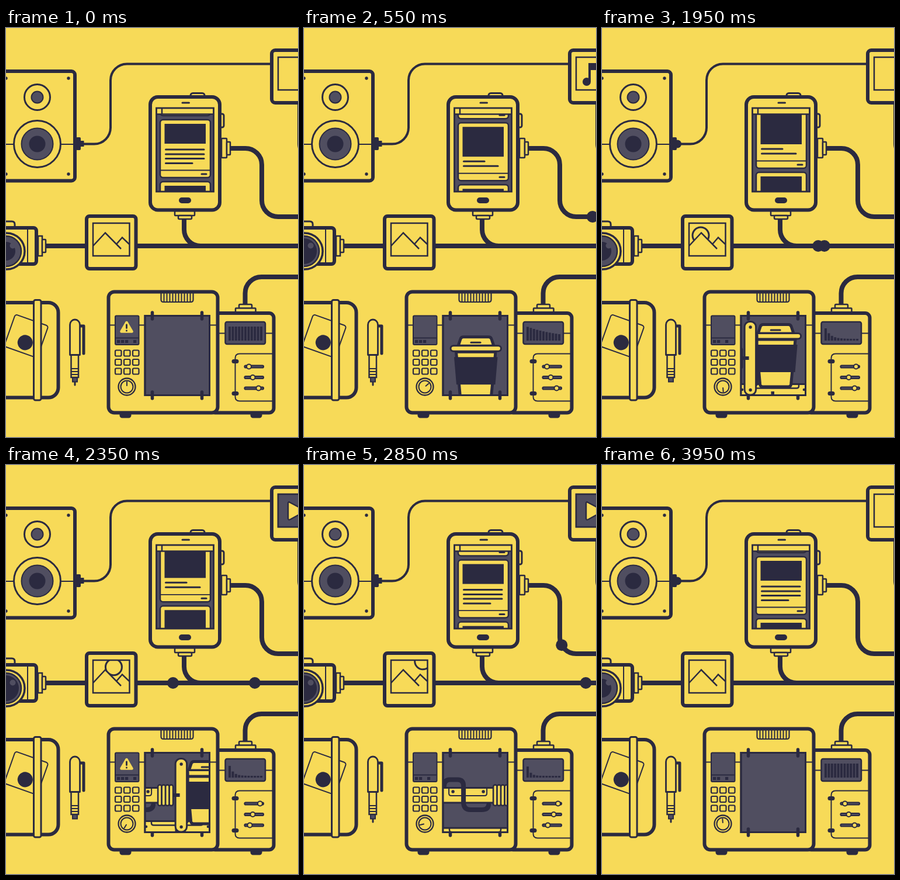
Animation, 500 px wide and 700 px high, one loop 4000 ms. Source, as an HTML page:

```html
<!DOCTYPE html>
<html lang="en">
<head>
<meta charset="utf-8">
<title>Connected devices</title>
<style>
  html, body { margin: 0; width: 100%; height: 100%; overflow: hidden; background: #f7da58; }
  svg { display: block; width: 500px; height: 700px; }
</style>
</head>
<body>
<svg id="stage" viewBox="0 0 500 700"></svg>
<script>
const INK = '#2b2a40', GREY = '#504e60', SUN = '#f7da58';
const LOOP = 4000;
const stage = document.getElementById('stage');

// Markup helpers; boxes are given by their stroke centre line.
const box = (x1, y1, x2, y2, r = 0, w = 3, fill = SUN, id = '') =>
  `<rect ${id && `id="${id}"`} x="${x1}" y="${y1}" width="${x2 - x1}" height="${y2 - y1}" rx="${r}" fill="${fill}" stroke="${INK}" stroke-width="${w}"/>`;
const line = (d, w = 3, fill = 'none') =>
  `<path d="${d}" fill="${fill}" stroke="${INK}" stroke-width="${w}" stroke-linecap="round" stroke-linejoin="round"/>`;
const flat = (d, w = 3) => `<path d="${d}" fill="none" stroke="${INK}" stroke-width="${w}"/>`;
const disc = (x, y, r, w = 0, fill = INK, id = '') =>
  `<circle ${id && `id="${id}"`} cx="${x}" cy="${y}" r="${r}" fill="${fill}" stroke="${INK}" stroke-width="${w}"/>`;
const group = (id, body, attrs = '') => `<g id="${id}" ${attrs}>${body}</g>`;
const clip = (id, x, y, w, h) =>
  `<clipPath id="${id}"><rect x="${x}" y="${y}" width="${w}" height="${h}"/></clipPath>`;
const repeat = (n, f) => Array.from({ length: n }, (_, i) => f(i)).join('');

const signals = [
  { d: 'M455 61.5H207A28 28 0 0 0 179 89.5V170.5A28 28 0 0 1 151 198.5H128', r: 7, from: 1000, to: 2000, every: 2000, ease: p => 1 - (1 - p) ** 2 },
  { d: 'M510 323H466A28 28 0 0 1 438 295V234A28 28 0 0 0 410 206H375', r: 10, from: 468, to: 1643, every: 2000, ease: p => p },
  { d: 'M305 320V345A28 28 0 0 0 333 373H510', r: 10, from: 917, to: 3094, every: LOOP, ease: p => p },
  { d: 'M510 373H180', r: 10, from: 1120, to: 2820, every: LOOP, ease: p => p ** 1.2 }
];

const wires = () =>
  flat('M133 198.5H151A28 28 0 0 0 179 170.5V89.5A28 28 0 0 1 207 61.5H455', 4) +
  flat('M501 130V198A28 28 0 0 0 520 225', 4) +
  flat('M384 206H410A28 28 0 0 1 438 234V295A28 28 0 0 0 466 323H510', 8) +
  flat('M305 325V345A28 28 0 0 0 333 373', 8) +
  flat('M66 373H510', 8) +
  flat('M409.5 474V454A28 28 0 0 1 437.5 426H510', 8);

const speaker = () =>
  box(-20, 74, 118, 261.5, 6, 6) +
  [[0, 86], [107, 86], [0, 250], [107, 250]].map(([x, y]) => disc(x, y, 2.7)).join('') +
  flat('M0 199H118', 2) +
  disc(53.5, 118.5, 22, 3, SUN) + disc(53.5, 118.5, 10, 2, GREY) +
  disc(53.5, 198.5, 40, 3, SUN) + disc(53.5, 198.5, 27, 2, GREY) + disc(53.5, 198.5, 14) +
  box(121, 188, 127, 208, 1, 2, INK) + box(127, 194, 132.5, 202, 0, 2, INK);

const monitor = () =>
  box(455, 38, 540, 128, 6, 6) + box(466, 50, 540, 106, 0, 2.5) +
  group('note', disc(484, 92, 7) + disc(507, 92, 7) + flat('M489 92V61', 4) +
    `<path d="M487 60H515V72H487Z" fill="${INK}"/>`) +
  group('play', box(466, 50, 540, 106, 0, 2.5, GREY) +
    line('M486 64Q483 62 483 66V91Q483 95 487 93L509 81Q512 78 509 76Z', 2.5, SUN));

const camera = () =>
  line('M-5 342V331H10Q15 331 15 336V342', 3, SUN) +
  box(-20, 342, 52, 404, 5, 6) + flat('M37 342V404', 2) +
  box(55, 356, 62, 390, 0, 2.5) + box(62, 362, 68, 384, 1, 2.5) +
  disc(1, 382, 31, 3.5, SUN) + disc(0, 382, 26, 2.5, GREY) +
  disc(0, 382, 16, 0, INK, 'pupil') + disc(11.5, 372.5, 5, 0, GREY);

const picture = () =>
  box(138, 322, 222.5, 412, 5, 6) +
  `<g clip-path="url(#photoClip)">` + disc(0, 0, 14, 3, SUN, 'sun') +
  `<path d="M149 373L170 350.5L190 370L199 358.5L211 370V392H149Z" fill="${SUN}"/>` +
  `</g>` +
  flat('M149 373L170 350.5L197 378M189.5 369.5L199 358.5L211 370', 2.5) +
  box(149, 334, 211.5, 390, 0, 2.5, 'none');

const feedCard = (y, tall) => {
  const image = tall ? 58 : 41;
  const rows = tall ? [[66, 309], [74, 332]] : [[51, 339], [59, 339], [66.5, 339], [74.5, 319]];
  return `<g transform="translate(0 ${y})">` + box(264, 0, 350, 99, 5, 2.5) +
    `<rect x="271.5" y="7" width="70.5" height="${image - 7}" fill="${INK}"/>` +
    rows.map(([ry, x]) => line(`M273.5 ${ry}H${x}`)).join('') +
    flat('M264 86.5H350', 1.8) + line('M335 93H343') + '</g>';
};

const phone = () =>
  box(316, 111.5, 340, 122, 4, 3) + box(362, 147, 373, 170, 3, 3) +
  box(369, 189, 378, 222, 1, 2.5) + box(378, 195, 384, 217, 1, 2.5) +
  box(289, 313, 323, 321, 1, 2.5) + box(295, 321, 318, 327, 2, 2.5) +
  box(247, 118, 366, 311.5, 13, 6) + line('M302 128H313.5', 3) +
  `<rect x="257" y="147" width="99" height="133" fill="${GREY}"/>` +
  `<g clip-path="url(#feedClip)">` +
  group('feed', repeat(5, i => feedCard(157 + (i - 1) * 106, i % 2 === 0))) + '</g>' +
  box(257.5, 137, 355.5, 280, 0, 2.8, 'none') + flat('M257 147.5H356M267 137V147', 2.5) +
  `<rect x="296" y="290" width="21" height="10" rx="5" fill="${INK}"/>`;

const notebook = () =>
  box(-20, 470, 89.5, 632.5, 17, 6) +
  `<g transform="translate(16 490) rotate(19.5)">` + box(0, 0, 60, 58, 4, 2) + disc(32, 40, 13) + '</g>' +
  box(47.5, 465.5, 60, 637, 3, 3);

const pen = () =>
  line('M118 604V611', 3).replace('<path', '<path id="penTip"') +
  box(114, 597, 122, 605.5, 0, 2, GREY) +
  box(111.5, 558, 124, 598, 0, 2.5) + flat('M112 583H124M112 588H124M112 593H124', 2) +
  group('penBody', line('M128 510H133V557', 5) +
    line('M109.5 559.5V508A8.5 9 0 0 1 126.5 508V559.5Z', 2.8, SUN));

const cup = () => group('cup',
  line('M260.5 533H328L320.5 610Q320 614 316 614H272Q268 614 267.5 610Z', 5, SUN) +
  `<path d="M257 542H331.5L327.5 589H261Z" fill="${INK}"/>` +
  line('M264 523L268 511Q269 507.5 273 507.5H316Q320 507.5 321 511L325 523Z', 5, SUN) +
  line('M286 517H302', 3) + box(251, 522.5, 337.5, 532, 5, 3));

const tray = () => group('tray',
  box(236, 609.5, 350, 645, 0, 3) + line('M249 610V613Q249 616.5 253 616.5H333Q337 616.5 337 613V610', 2.5) +
  `<rect x="289.5" y="622" width="5.5" height="6" fill="${INK}"/>` + disc(240, 619, 2.3) + disc(346, 619, 2.3));

// Drawn with the left edge of the pushing arm at x = 0.
const piston = () => group('piston',
  box(-190, 552.5, -25, 578, 0, 3) +
  line('M-106 553V562Q-106 566 -102 566H-45Q-41 566 -41 562V553', 2) +
  disc(-99, 559, 2.7) + disc(-47, 559, 2.7) +
  line('M-114 549Q-114 538.5 -104 538.5H-91Q-81 538.5 -81 549V577Q-81 590 -69 590H-50Q-39 590 -38 582', 8) +
  box(13, 522, 22, 612, 4, 3) + box(0, 502.5, 19.5, 628, 9, 3) +
  disc(10, 512, 2.7) + disc(10, 619.5, 2.7) +
  repeat(4, i => box(-30 + i * 6.5, 547.5, -23.5 + i * 6.5, 583, 3, 2.6)) +
  `<rect x="-3" y="562" width="10.5" height="6" fill="${INK}"/>`);

const machine = () =>
  box(196, 655, 213, 666, 3, 3, INK) + box(420, 655, 437, 666, 3, 3, INK) +
  box(399, 473, 421, 480, 2, 2.5) + box(393, 479.5, 427.5, 487, 1, 2.5) +
  box(350, 488, 458.5, 658.5, 8, 6) + box(175.5, 451.5, 362.5, 658.5, 10, 6) +
  flat('M175 508.5H187M228 508.5H238M349 508.5H362M362 522.5H375M444 522.5H458', 2) +
  line('M265.5 453V465Q265.5 469 269.5 469H316.5Q320.5 469 320.5 465V453', 2.2) +
  flat(repeat(10, i => `M${270.5 + i * 5} 453V469`), 2) +
  box(187, 492.5, 227.5, 542, 2, 2, GREY) + flat('M187 530.5H228', 2) +
  group('warning', `<path d="M206.5 504L215.5 519.5H197.5Z" fill="${SUN}" stroke="${SUN}" stroke-width="4.5" stroke-linejoin="round"/>` +
    line('M206.5 508V513.5M206.5 518V518.2', 2.8)) +
  group('leds', repeat(5, i => `<rect x="${190 + i * 7}" y="534" width="5.2" height="5" fill="${INK}"/>`)) +
  repeat(9, i => {
    const x = 187 + i % 3 * 15, y = 551.5 + Math.floor(i / 3) * 15.5;
    return box(x, y, x + 10.5, y + 10, 2, 2.2);
  }) +
  disc(207, 614, 14.5, 2.3, SUN) + disc(207, 614, 10.5, 2, SUN) +
  group('dial', line('M207 612V605.5', 2)) +
  box(238, 492.5, 348.5, 628.5, 0, 3, GREY) +
  line('M250.5 487V498M335.5 487V498M250.5 623V634M335.5 623V634', 5.5) +
  `<g clip-path="url(#windowClip)">${tray()}${cup()}${piston()}</g>` +
  box(238, 492.5, 348.5, 628.5, 0, 3, 'none') +
  box(375.5, 503, 444, 541, 3, 2.5, GREY) +
  group('bars', repeat(11, i => `<rect x="${381 + i * 5.4}" width="4" fill="${INK}"/>`)) +
  line('M458 557.5H400Q392.5 557.5 392.5 565V631Q392.5 638.5 400 638.5H458', 2) +
  line('M390 570.5H395M390 625.5H395', 7) +
  [579.5, 598, 616.5].map((y, i) =>
    box(408.5, y - 2, 441, y + 2, 2, 2.2, GREY) + disc(0, y, 4, 2, SUN, 'knob' + i)).join('');

stage.innerHTML =
  '<defs>' + clip('feedClip', 257, 147, 99, 133) + clip('photoClip', 149, 334, 62, 56) +
  clip('windowClip', 238, 492, 110.5, 136.5) + '</defs>' +
  wires() +
  signals.map((s, i) => `<path id="route${i}" d="${s.d}" fill="none"/>` + disc(0, 0, s.r, 0, INK, 'signal' + i)).join('') +
  speaker() + monitor() + camera() + picture() + phone() + notebook() + pen() + machine();

const $ = id => document.getElementById(id);
const put = (id, attrs) => { for (const k in attrs) $(id).setAttribute(k, attrs[k]); };
const shift = (id, x, y) => put(id, { transform: `translate(${x} ${y})` });
const show = (id, on) => put(id, { visibility: on ? 'visible' : 'hidden' });

const clamp = p => Math.min(1, Math.max(0, p));
const cubic = p => p < 0.5 ? 4 * p ** 3 : 1 - 4 * (1 - p) ** 3;
const ramp = (t, a, b) => cubic(clamp((t - a) / (b - a)));
const there = (t, a, b, c, d) => ramp(t, a, b) - ramp(t, c, d);

// Linear interpolation through [time, value] keys.
function track(t, keys) {
  const i = keys.findIndex(k => k[0] > t);
  if (i === 0) return keys[0][1];
  if (i < 0) return keys[keys.length - 1][1];
  const [[t0, v0], [t1, v1]] = [keys[i - 1], keys[i]];
  return v0 + (v1 - v0) * (t - t0) / (t1 - t0);
}

const routes = signals.map((_, i) => $('route' + i));
const lengths = routes.map(r => r.getTotalLength());
const ledSteps = ['11101', '11111', '11101', '11100', '11000', '11010'];

function drawSignals(t) {
  signals.forEach((s, i) => {
    const now = t % s.every;
    const on = now >= s.from && now < s.to;
    show('signal' + i, on);
    if (!on) return;
    const p = routes[i].getPointAtLength(lengths[i] * s.ease((now - s.from) / (s.to - s.from)));
    put('signal' + i, { cx: p.x, cy: p.y });
  });
}

function drawMachine(t) {
  const arm = track(t, [[1700, 214], [1950, 244], [2350, 290], [2850, 354], [2950, 364], [3100, 364], [3700, 205]]);
  const rise = 122 * (1 - ramp(t, 0, 850));
  shift('piston', arm, 0);
  show('piston', t > 1650 && t < 3750);
  shift('cup', Math.max(0, arm - 241), rise);
  show('cup', t < 2950);
  shift('tray', 0, rise + 40 * ramp(t, 2600, 3200));

  const second = t % 1000;
  show('warning', second < 500);
  const leds = ledSteps[Math.floor(second * 6 / 1000)];
  [...$('leds').children].forEach((led, i) => led.setAttribute('opacity', leds[i]));
  put('dial', { transform: `rotate(${t / LOOP * 360} 207 614)` });

  const refill = ramp(t, 3100, 3700);
  [...$('bars').children].forEach((bar, i) => {
    const low = 3 + 21 * Math.exp(-0.23 * (i + 0.25) * (t / 1000) ** 1.5);
    const h = low + (24 - low) * refill;
    bar.setAttribute('y', 535 - h);
    bar.setAttribute('height', h);
  });

  put('knob0', { cx: 416 + 19 * there(t, 750, 1100, 3300, 3700) });
  put('knob1', { cx: 422.5 + 10 * there(t, 2650, 3050, 3300, 3700) });
  put('knob2', { cx: 432.5 - 15 * there(t, 2000, 2300, 3300, 3700) });
}

function draw(t) {
  drawSignals(t);
  drawMachine(t);

  shift('feed', 0, -122 * ramp(t, 0, 850) - 90 * ramp(t, 2100, 3100));

  const half = t % 2000, awake = half > 200 && half < 1600;
  show('note', awake && t < 2000);
  show('play', awake && t >= 2000);
  put('pupil', { r: 16 + 6 * there(half, 100, 350, 1500, 1800) });

  const u = (t - 1950) * 0.0385;
  put('sun', { cx: 169 + u, cy: 355 - 0.64 * u + 0.0025 * u * u });

  const press = there(t, 1080, 1200, 1200, 1320) + there(t, 2550, 2670, 2670, 2790);
  shift('penBody', 0, 2.5 * press);
  show('penTip', t < 1250 || t > 2670);
}

const start = performance.now();
function tick() {
  draw((performance.now() - start) % LOOP);
  requestAnimationFrame(tick);
}
tick();
</script>
</body>
</html>
```
